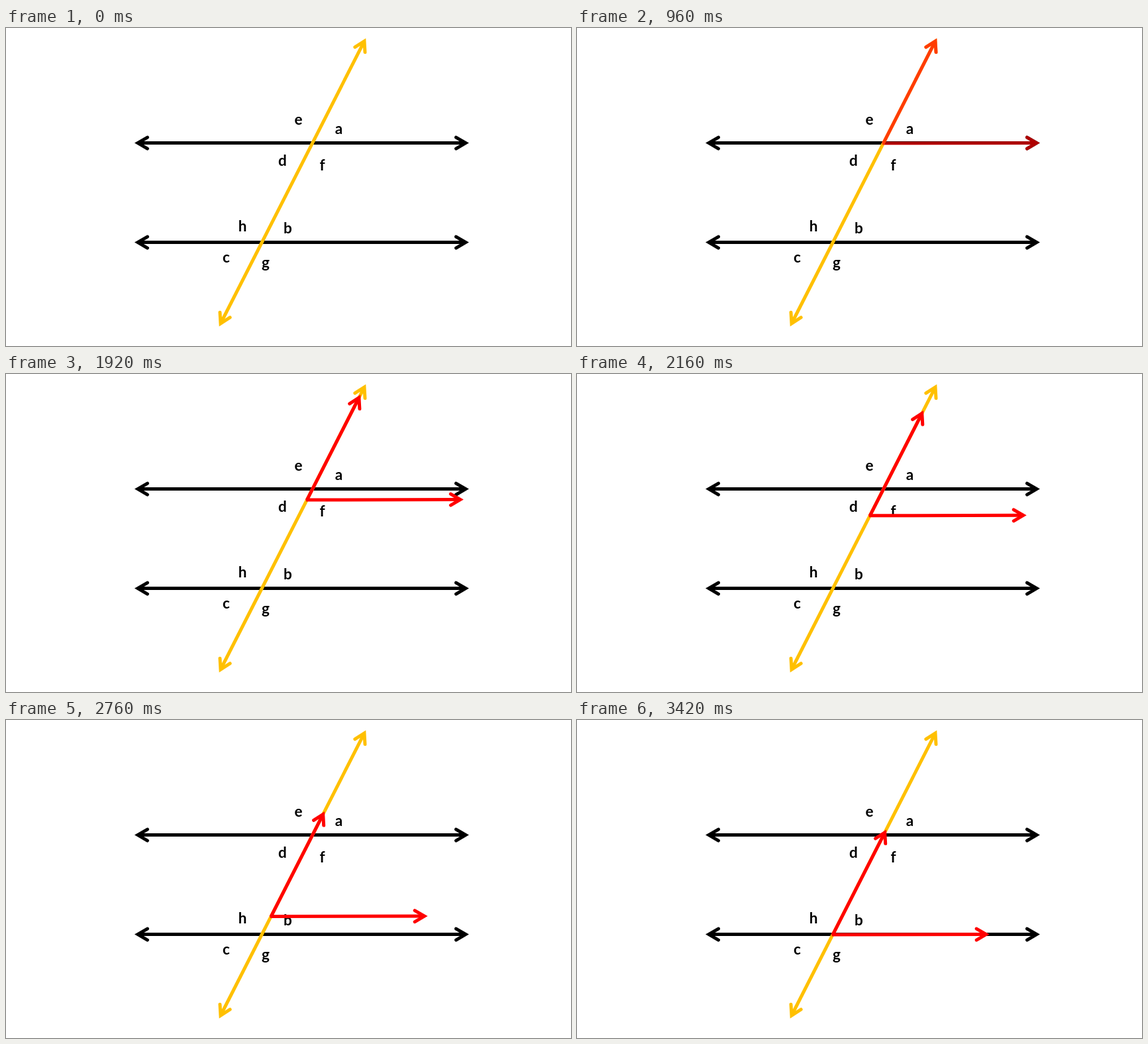
Animation of 853 by 480 pixels, one loop 5490 ms. Source, as an HTML page:

```html
<!DOCTYPE html>
<html lang="en">
<head>
<meta charset="utf-8">
<title>Corresponding angles</title>
<style>
html, body { margin: 0; width: 100%; height: 100%; overflow: hidden; background: #fff; }
svg { display: block; width: 100%; height: 100%; }
path { fill: none; stroke-width: 5; stroke-linecap: round; stroke-miterlimit: 6; }
.shaft { stroke-linecap: butt; }
text { font: 700 22.5px Lato, "Open Sans", sans-serif; text-anchor: middle; }
</style>
</head>
<body>
<svg id="stage" viewBox="0 0 853 480">
  <g id="lines"></g>
  <g id="labels"></g>
  <g id="angle" opacity="0"></g>
</svg>
<script>
const LOOP = 5490, STEP = 60;
const FADE_END = 1410, MOVE_START = 1505, MOVE_TIME = 1800;
const SHIFT = [-76.3, 150];
const get = id => document.getElementById(id);
const angle = get('angle');

function add(parent, tag, attrs, text = '') {
  const el = document.createElementNS('http://www.w3.org/2000/svg', tag);
  for (const key in attrs) el.setAttribute(key, attrs[key]);
  el.textContent = text;
  parent.append(el);
}

// Open arrowhead at (x2, y2), pointing away from (x1, y1)
function head(x1, y1, x2, y2) {
  const len = Math.hypot(x2 - x1, y2 - y1);
  const ux = (x2 - x1) / len, uy = (y2 - y1) / len;
  const barb = side => `${x2 - 14.5 * ux - side * uy} ${y2 - 14.5 * uy + side * ux}`;
  return `M${barb(8.5)}L${x2} ${y2}L${barb(-8.5)}`;
}

function arrow(parent, stroke, x1, y1, x2, y2, both) {
  add(parent, 'path', { class: 'shaft', stroke, d: `M${x1} ${y1}L${x2} ${y2}` });
  add(parent, 'path', { stroke, d: head(x1, y1, x2, y2) });
  if (both) add(parent, 'path', { stroke, d: head(x2, y2, x1, y1) });
}

const lines = get('lines');
for (const y of [173.6, 323.6]) arrow(lines, '#000', 199, y, 694, y, true);
arrow(lines, '#ffc000', 324, 446, 541, 19.8, true);

const labels = [
  ['e', 441.5, 146], ['a', 502.5, 160], ['d', 417.5, 208], ['f', 477.5, 215],
  ['h', 357, 307], ['b', 425.5, 310], ['c', 332.5, 354], ['g', 392, 362]
];
for (const [letter, x, y] of labels) add(get('labels'), 'text', { x, y }, letter);

arrow(angle, '#f00', 462.2, 174.6, 541, 19.8);
arrow(angle, '#f00', 461, 174.1, 694, 173.6);

const clamp = v => Math.min(1, Math.max(0, v));
const ease = u => u < 0.5 ? 2 * u * u : 1 - 2 * (1 - u) ** 2;

function draw(time) {
  const t = Math.floor(time % LOOP / STEP) * STEP;
  const k = ease(clamp((t - MOVE_START) / MOVE_TIME));
  angle.setAttribute('opacity', clamp(t / FADE_END));
  angle.setAttribute('transform', `translate(${SHIFT[0] * k} ${SHIFT[1] * k})`);
}

const start = performance.now();
function tick() {
  draw(performance.now() - start);
  requestAnimationFrame(tick);
}
tick();
</script>
</body>
</html>
```
